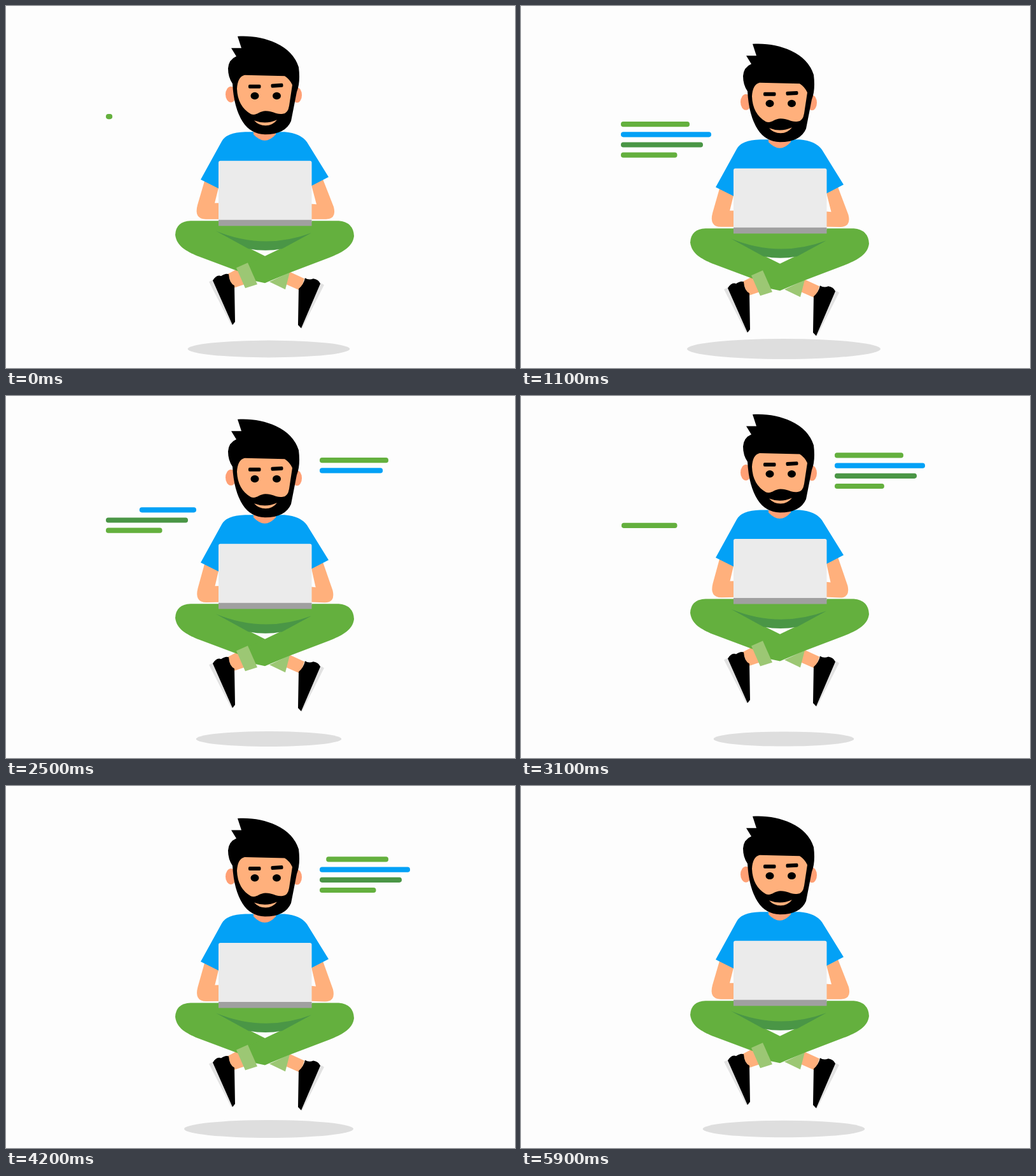
Write an HTML page that moves like this. It is 800x570 px and loops after 6000 ms.

```html
<!DOCTYPE html>
<html lang="en">
<head>
<meta charset="utf-8">
<title>Floating coder</title>
<style>
  html, body { margin: 0; width: 100%; height: 100%; overflow: hidden; background: #fdfdfd; }
  svg { display: block; width: 800px; height: 570px; filter: blur(0.6px); }
  .skin { fill: #ffb07c; }
  .blush { fill: #ffa075; }
  .leaf { fill: #64b03e; }
  .moss { fill: #4a9646; }
  .cuff { fill: #9cc774; }
  .sky { fill: #03a1f6; }
  .sole { fill: #e2e2e2; }
</style>
</head>
<body>
<svg viewBox="0 0 800 570">
  <ellipse id="shadow" cx="413" cy="540" fill="#dedede"/>
  <g id="body">
    <g id="code"></g>

    <!-- arms and shirt -->
    <path id="armL" class="skin" d="M313 272L301 313Q295 335 314 335.500H340V310H328L335 282Z"/>
    <path id="armR" class="skin" d="M497 270L515 316Q520 335 503 335.500H474V311L488 312L479 278Z"/>
    <path class="sky" d="M306 273L339 213Q346 199 376 198H438Q463 200 473 214L507 269L480 283V300H334V287Z"/>
    <path class="blush" d="M389 196V202Q407 221 424 202V196Z"/>

    <!-- feet -->
    <path class="skin" d="M348 422L365 413L375 438L357 444Z"/>
    <path class="skin" d="M445 418L469 429L463 448L438 437Z"/>
    <path class="sole" d="M319 434L327 430L359 499L354 502Z"/>
    <path d="M325 432Q331 422 338 425Q345 420 350 422Q351 436 359 440L360 497L356 502Z"/>
    <path class="sole" d="M493 435L500 439L465 508L461 506Z"/>
    <path d="M460 445Q468 438 470 428Q476 432 483 429Q491 430 494 437L464 507L459 502Z"/>

    <!-- legs -->
    <path class="cuff" d="M414 434L446 419L439 446Z"/>
    <path class="leaf" d="M290 338H420V400L372 420L364 417L300 393C284 386 268 378 266 360Q267 339 290 338Z"/>
    <path class="leaf" d="M400 338H523Q546 340 547 362C545 379 529 387 513 394L445 420L407 436L388 432L379 406L400 397Z"/>
    <path d="M380 380L407 393.500L435 380Z" fill="#fdfdfd"/>
    <path class="moss" d="M330 354Q405 385 480 357L434 382Q408 387 381 382Z"/>
    <path class="cuff" d="M362 412L380 404L395 438L376 444Z"/>

    <!-- laptop -->
    <rect x="334" y="243.500" width="146.500" height="98" rx="3" fill="#ebebeb"/>
    <rect x="334" y="336.500" width="146.500" height="9.500" fill="#a0a0a0"/>

    <!-- head -->
    <ellipse class="blush" cx="353.500" cy="139" rx="8.500" ry="12.500"/>
    <ellipse class="blush" cx="457.500" cy="140" rx="7.500" ry="12"/>
    <path d="M364 47.500C385 46 407 50 424 58Q452 71 460 96Q463 120 457 135L448 181Q439 202 407 202Q384 201 372 182Q358 160 356 122Q349 112 349 98Q350 84 362 79L354 66H370Z"/>
    <path class="skin" d="M363 130Q364 111 375 108.500L438 110Q446 115 450 124L445 157Q443 169 435 169.500C424 171 420 165 408 165C398 165 394 173 385 170Q364 158 363 130Z"/>
    <path class="skin" d="M390 180Q408 187 426 179Q419 188 408 188Q397 188 390 180Z"/>
    <rect x="381" y="123.500" width="19.500" height="6" rx="2"/>
    <rect x="416.500" y="122" width="19" height="6" rx="2" transform="rotate(-3 426 125)"/>
    <ellipse class="eye" cx="391" cy="141.200" rx="6.500"/>
    <ellipse class="eye" cx="425.500" cy="141.200" rx="6.500"/>
  </g>
</svg>
<script>
  const LOOP = 6000, STEP = 100;
  const $ = id => document.getElementById(id);
  const set = (el, attrs) => { for (const k in attrs) el.setAttribute(k, attrs[k]); };
  const clamp = v => Math.min(1, Math.max(0, v));

  const LENGTHS = [108, 142, 129, 88.5];
  const TONES = ['leaf', 'sky', 'moss', 'leaf'];
  // Each block types its lines in turn, then wipes them from the left.
  const BLOCKS = [
    { x: 157, y: 122.7, type: -26, wipe: 1998, gap: 366 },
    { x: 493, y: 60.8, type: 2033, wipe: 4166, gap: 360 }
  ];
  const TYPE_GAP = 275;

  const bars = BLOCKS.flatMap(b => LENGTHS.map((len, i) => {
    const el = document.createElementNS('http://www.w3.org/2000/svg', 'rect');
    set(el, { class: TONES[i], y: b.y + 47 + i * 16.2, height: 8.2, rx: 3.8 });
    $('code').append(el);
    return { el, b, i, len };
  }));
  const eyes = document.querySelectorAll('.eye');

  // Height of the hair tip: highest at 3 s, lowest at 1 s and 5 s.
  function hover(t) {
    const phase = (t + 1000) % 4000;
    const sinking = phase < 2000;
    const u = sinking ? phase / 2000 : 2 - phase / 2000;
    return 26.2 + 34.5 * (u + (sinking ? 0.11 : 0.06) * Math.sin(Math.PI * u));
  }

  function draw(t) {
    const y = hover(t);
    set($('body'), { transform: `translate(0 ${y - 47})` });
    const rx = 110 + 0.0368 * (y - 25.5) ** 2;
    set($('shadow'), { rx, ry: rx * 0.105 });

    for (const { el, b, i, len } of bars) {
      const head = len * clamp((t - b.type - i * TYPE_GAP) / TYPE_GAP);
      const tail = len * clamp((t - b.wipe - i * b.gap) / b.gap);
      set(el, { x: b.x + tail, width: Math.max(0, head - tail) });
    }

    const sway = (1 - Math.cos(2 * Math.PI * t / LOOP)) / 2;
    set($('armL'), { transform: `rotate(${-sway} 324 282)` });
    set($('armR'), { transform: `rotate(${2.5 * sway} 488 280)` });

    const blink = clamp(1 - Math.abs(t - 5000) / 200);
    eyes.forEach(e => set(e, { ry: 5.7 - 5 * blink }));
  }

  function tick() {
    draw(Math.floor(performance.now() % LOOP / STEP) * STEP);
    requestAnimationFrame(tick);
  }
  tick();
</script>
</body>
</html>
```
